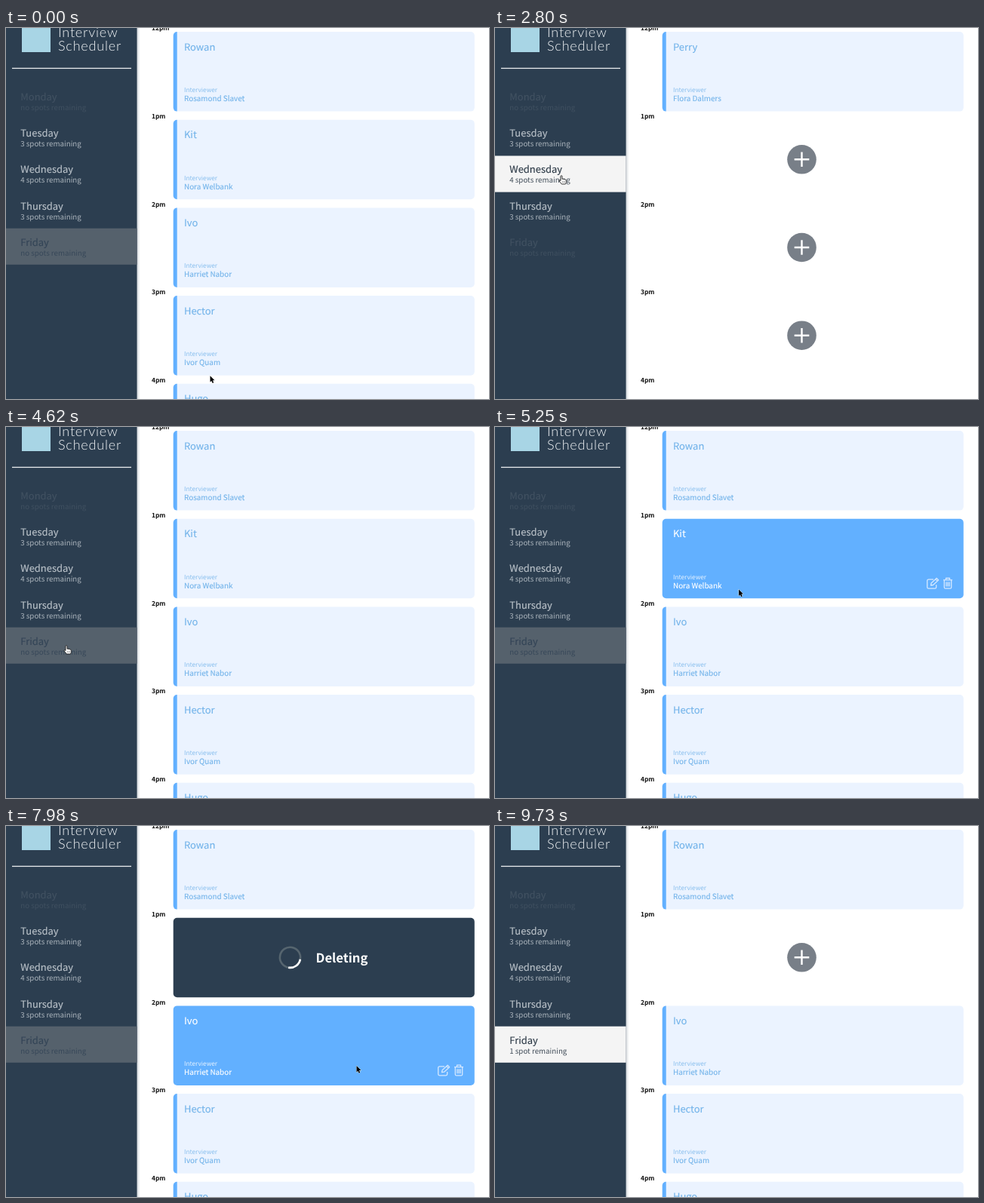
These frames come from a looping animation (640 px wide and 492 px high, 9.8 s). An HTML page:

```html
<!DOCTYPE html>
<html lang="en">
<head>
<meta charset="utf-8">
<title>Interview Scheduler</title>
<style>
  html, body { margin: 0; width: 100%; height: 100%; overflow: hidden; background: #fff; }
  svg { display: block; width: 640px; height: 492px; }
  text {
    font-family: "Noto Sans CJK JP", "Noto Sans CJK SC", "Noto Sans CJK", "Open Sans", sans-serif;
    text-rendering: geometricPrecision;
    white-space: pre;
  }
  .logo { font: 300 18px Lato, "Open Sans", sans-serif; letter-spacing: .8px; fill: #f2f5f7; }
  .title { font-size: 12.95px; stroke-width: .15px; }
  .small { font-size: 9.75px; }
  .person { font-size: 9.9px; stroke-width: .15px; }
  .label { font-size: 8.25px; }
  .hour { font-size: 8.4px; font-weight: 700; }
  .big { font-size: 16.65px; font-weight: 700; }
  .mid { text-anchor: middle; }
</style>
</head>
<body>
<svg viewBox="0 0 640 492">
  <defs>
    <linearGradient id="edge">
      <stop offset="0" stop-color="#d5d9dd"/>
      <stop offset="1" stop-color="#fff"/>
    </linearGradient>
  </defs>
  <rect width="640" height="492" fill="#fff"/>
  <rect x="173.600" width="4" height="492" fill="url(#edge)"/>
  <rect width="173.600" height="492" fill="#2c3e50"/>
  <rect x="21" y="-6" width="38" height="38" fill="#a8d5e5"/>
  <text class="logo" x="69" y="12.4">Interview</text>
  <text class="logo" x="69" y="29.6">Scheduler</text>
  <rect x="8" y="52.800" width="158" height="1.300" fill="#e9ecee"/>
  <g id="days"></g>
  <g id="slots"></g>
  <g id="cursor"></g>
</svg>
<script>
const LOOP = 9800, STEP = 70, HEIGHT = 492;
const NAVY = '#2c3e50', BLUE = '#62b0ff', RED = '#db6669';
const LEFT = 221.7, RIGHT = 620.8, PITCH = 116.7, CARD_H = 105.6;
const CLICK = { wed: 2590, thu: 3500, fri: 4550, trash: 6160, confirm: 7210, gone: 8470 };

const week = [['Monday', 0], ['Tuesday', 3], ['Wednesday', 4], ['Thursday', 3], ['Friday', 0]];
const hours = ['12pm', '1pm', '2pm', '3pm', '4pm'];
const bookings = {
  2: [['Perry', 'Flora Dalmers']],
  3: [null, ['Sam', 'Helen Tarrolds'], ['Owen', 'Ivor Quam']],
  4: [['Rowan', 'Rosamond Slavet'], ['Kit', 'Nora Welbank'], ['Ivo', 'Harriet Nabor'],
      ['Hector', 'Ivor Quam'], ['Hugo', 'Rosamond Slavet']]
};

// time, x, y of the pointer tip
const path = [
  [0, 270.5, 461.2], [70, 270.5, 461.2], [420, 205, 461.2], [1050, 121, 190], [1400, 88, 196],
  [3220, 88, 196], [3430, 81, 244.5], [4200, 81, 244.5], [4480, 80, 290], [4620, 80, 290],
  [5180, 323, 215.5], [5320, 323, 215.5], [5880, 597.5, 209], [6440, 597.5, 209],
  [6930, 465, 205], [7210, 465, 205], [7630, 464.5, 318], [8400, 464.5, 318], [9170, 380, 510]
];

const $ = id => document.getElementById(id);
const slotTop = i => 5 + PITCH * i;
const text = (cls, x, y, s, color) =>
  `<text class="${cls}" x="${x}" y="${y}" fill="${color}" ` +
  `${/title|person/.test(cls) ? `stroke="${color}"` : ''}>${s}</text>`;
const box = (x, y, w, h, r, attrs) =>
  `<rect x="${x}" y="${y}" width="${w}" height="${h}" rx="${r}" ${attrs}/>`;
const panel = (y, color) => box(LEFT, y, RIGHT - LEFT, CARD_H, 5, `fill="${color}"`);

function pointer(t) {
  const i = path.findIndex(p => p[0] > t);
  if (i < 0) return path[path.length - 1].slice(1);
  const [t0, x0, y0] = path[i - 1], [t1, x1, y1] = path[i];
  const k = (t - t0) / (t1 - t0), e = k * k * (3 - 2 * k);
  return [x0 + (x1 - x0) * e, y0 + (y1 - y0) * e];
}

function dayItem(i, active, spots) {
  const [name] = week[i], y = 73.3 + 48.1 * i, full = !spots;
  const color = full ? (active ? '#344557' : '#425262') : active ? '#2f3c49' : '#b9c1c8';
  const fill = full ? '#55616c' : '#f4f4f4';
  const back = active ? `<rect y="${y}" width="173.6" height="48.1" fill="${fill}"/>` : '';
  const note = `${spots || 'no'} spot${spots === 1 ? '' : 's'} remaining`;
  return back + text('title', 19.3, y + 22.9, name, color) +
    `<g opacity=".9">${text('small', 19.2, y + 35.9, note, color)}</g>`;
}

function card(y, [student, person], hover) {
  const color = hover ? '#fff' : '#74b4ea';
  const bar = `<path fill="${BLUE}" d="M${LEFT + 5} ${y}v${CARD_H}a5 5 0 0 1 -5 -5V${y + 5}a5 5 0 0 1 5 -5z"/>`;
  return panel(y, hover ? BLUE : '#ebf3ff') + (hover ? '' : bar) +
    text('title', 236, y + 24.5, student, color) +
    `<g opacity=".85">${text('label', 236, y + 79.8, 'Interviewer', color)}</g>` +
    text('person', 236, y + 91.9, person, color) +
    (hover ? icons(y) : '');
}

function icons(y) {
  return `<g transform="translate(572 ${y + 78})" fill="none" stroke="#d5e8ff" stroke-width="1.3" stroke-linejoin="round">
    <path d="M9 2.5H2.5q-1.8 0-1.8 1.8v8.4q0 1.8 1.8 1.8h8.4q1.8 0 1.8-1.8V9.5"/>
    <path d="M5.5 10.3l.6-3 7-6.5 2.5 2.5-7 6.5zM11.7 2.2l2.5 2.5"/>
    <path d="M22 3.2h12M25.5 3V.8h5V3M23.3 3.4v9.6q0 1.5 1.5 1.5h6.4q1.5 0 1.5-1.5V3.4M25.9 5.8v6M28 5.8v6M30.1 5.8v6"/>
  </g>`;
}

function empty(y) {
  const cy = y + 52.6;
  return `<circle cx="406.5" cy="${cy}" r="19.3" fill="#787f88"/>
    <path d="M396.7 ${cy}h19.6M406.5 ${cy - 9.8}v19.6" stroke="#fff" stroke-width="2.4"/>`;
}

function confirmBox(y) {
  const button = (x, label) =>
    box(x, y + 74.4, 76, 18.2, 9.1, `fill="none" stroke="${RED}" stroke-width="1.3"`) +
    text('title mid', x + 38, y + 88, label, RED);
  return box(LEFT + .6, y + .6, RIGHT - LEFT - 1.2, CARD_H - 1.2, 4.5,
      `fill="#fee9e8" stroke="${RED}" stroke-width="1.3"`) +
    text('big mid', 421.2, y + 29.8, 'Are you sure you would like to delete', RED) +
    button(339.5, 'Cancel') + button(426.5, 'Confirm');
}

function deleting(y, t) {
  const turn = (t - 7980) * .36 + 10;
  return panel(y, NAVY) +
    `<g transform="translate(376.5 ${y + 52.6}) rotate(${turn})" fill="none" stroke-width="2.6">
      <circle r="13.6" stroke="#56656f"/>
      <path d="M13.6 0A13.6 13.6 0 0 1 0 13.6" stroke="#fff"/>
    </g>` + text('big', 410.5, y + 59, 'Deleting', '#fff');
}

function slot(i, day, t, [px, py]) {
  const y = slotTop(i), booking = bookings[day][i];
  if (day === 4 && i === 1) {
    if (t >= CLICK.gone) return empty(y);
    if (t >= CLICK.confirm) return deleting(y, t);
    if (t >= CLICK.trash) return confirmBox(y);
  }
  if (!booking) return i < 4 ? empty(y) : '';
  const hover = px >= LEFT && px <= RIGHT && py >= y && py <= Math.min(y + CARD_H, HEIGHT);
  return card(y, booking, hover);
}

function cursor(x, y, t) {
  const overTrash = t < CLICK.trash && x > 592 && x < 607 && y > 198;
  const overButton = t >= CLICK.trash && t < CLICK.confirm && x > 339 && x < 503 && y < 215;
  const hand = x < 174 || overTrash || overButton;
  const shape = hand
    ? `<path d="M-1 .8Q-1-.3 0-.3T1 .8V4.3Q2.3 3.4 3 4.7 4.4 4 4.9 5.2 6.3 4.8 6.3 6.3V8.3Q6.3 9.8 5.3 11H.3Q-1.2 8.9-3 6.9-3.3 5.5-2 5.7L-1 6.6z" fill="#fff" stroke="#222" stroke-width=".9"/>
       <path d="M1.3 7.2v2M2.9 7.2v2M4.4 7.2v2" stroke="#444" stroke-width=".5"/>`
    : `<path d="M0 0V8.4L1.9 6.7 3.2 9.7 4.7 9 3.4 6.1H5.9z" fill="#000" stroke="#fff" stroke-width=".8" paint-order="stroke"/>`;
  return `<g transform="translate(${x} ${y})">${shape}</g>`;
}

function draw(t) {
  const day = t < CLICK.wed || t >= CLICK.fri ? 4 : t < CLICK.thu ? 2 : 3;
  const at = pointer(t);
  $('days').innerHTML = week.map(([, spots], i) =>
    dayItem(i, i === day, i === 4 && t >= CLICK.gone ? 1 : spots)).join('');
  $('slots').innerHTML = hours.map((h, i) =>
    text('hour', 193, 3.3 + PITCH * i, h, '#111') + slot(i, day, t, at)).join('');
  $('cursor').innerHTML = cursor(...at, t);
}

const start = performance.now();
let last = -1;
function tick() {
  const t = Math.floor(((performance.now() - start) % LOOP) / STEP) * STEP;
  if (t !== last) draw(last = t);
  requestAnimationFrame(tick);
}
tick();
</script>
</body>
</html>
```
